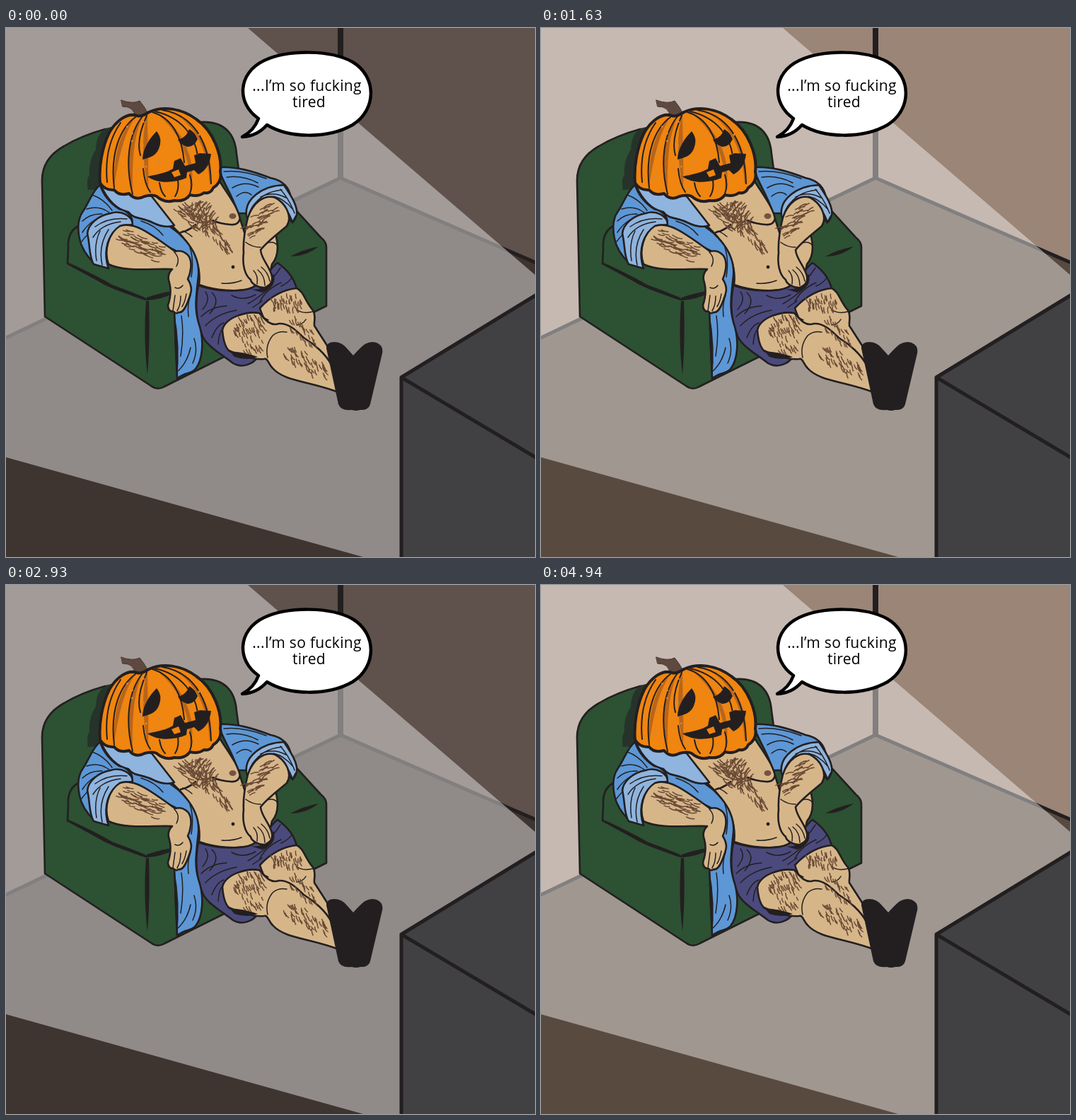
An HTML page for the animation above (5.01 s loop, 748 px wide and 748 px high).

```html
<!DOCTYPE html>
<html lang="en">
<head>
<meta charset="utf-8">
<title>Tired pumpkin</title>
<style>
html, body { margin: 0; width: 100%; height: 100%; overflow: hidden; }
svg { display: block; width: 100%; height: 100%; }
path { stroke-linejoin: round; stroke-linecap: round; }
.ink path, .line { stroke: #231f20; stroke-width: 2.6; }
.line { fill: none; }
.thin { stroke: #231f20; stroke-width: 1.5; fill: none; }
.dark { fill: #231f20; }
.green { fill: #2d5133; }
.skin { fill: #d6b689; }
.robe { fill: #5d97d6; }
.cuff { fill: #8fb4de; }
.shorts { fill: #4b4a7d; }
.hair { fill: none; stroke: #6a4a35; stroke-width: 1.5; }
.glow { animation: flicker 5.01s step-end infinite; }
/* The television light switches between two levels. */
@keyframes flicker {
  0%, 8.58%, 18.56%, 28.54%, 40.51%, 51.89%, 58.48%, 74.45%, 83.83%, 93.21% { opacity: 0; }
  3.99%, 12.57%, 25.14%, 32.53%, 44.51%, 55.88%, 63.87%, 79.84%, 89.22%, 98.6% { opacity: 1; }
}
text { font: 21px "Comic Sans MS", "Comic Neue", "Open Sans", sans-serif; letter-spacing: .3px; text-anchor: middle; }
</style>
</head>
<body>
<svg viewBox="0 0 748 748">
  <!-- room -->
  <path fill="#5f514b" d="M0,0H748V748H0Z"/>
  <path fill="#3e3430" d="M0,438L473,212L748,331V748H0Z"/>
  <g class="glow">
    <path fill="#9b8577" d="M0,0H748V748H0Z"/>
    <path fill="#594a40" d="M0,438L473,212L748,331V748H0Z"/>
  </g>
  <path class="line" style="stroke-width:5" d="M-4,440L473,212L752,333"/>
  <path class="line" style="stroke-width:8" d="M473,-5V211"/>
  <path fill="#fff" fill-opacity=".427" d="M0,0H342L748,349V748H505L0,607Z"/>

  <!-- television -->
  <path fill="#414143" d="M559,494L748,378V748H559Z"/>
  <path class="line" style="stroke-width:5" d="M559,752V494L752,376M559,494L752,609"/>

  <!-- armchair -->
  <g class="ink">
    <path class="green" d="M55,408L51,218C50,192 66,176 82,167C102,155 122,148 140,143L275,133C309,131 324,150 326,178L329,200L403,250L445,296Q453,302 453,310V393L224,507Q214,513 205,506Z"/>
  </g>
  <path fill="#26332a" d="M154,139C135,141 128,152 127,172C119,184 117,198 118,208C112,216 117,222 115,229L140,228L152,160Z"/>
  <path class="line" d="M104,279C91,285 87,298 88,312L87,333L139,361Q178,378 198,384Q218,383 236,374"/>
  <path class="dark" d="M87,331Q130,351 150,363Q180,374 201,383Q170,378 139,363ZM198,386L202,386Q204,445 200,490Q194,440 198,386ZM199,381Q220,374 236,372Q220,381 199,384ZM402,323Q420,313 442,309Q424,323 402,323Z"/>

  <!-- far sleeve -->
  <g class="ink">
    <path class="robe" d="M300,197C325,195 350,203 374,212C394,216 401,228 403,240C413,255 413,267 405,275L380,250L345,262L328,262C320,235 308,222 300,197Z"/>
    <path class="cuff" d="M340,265C337,242 362,223 393,222C403,237 413,252 411,264L405,275C399,257 389,246 375,239C357,239 345,252 342,272Z"/>
  </g>
  <path class="thin" d="M312,211Q335,208 356,219M308,203Q335,200 368,213M320,226Q338,215 357,225M326,238Q338,228 347,236M349,253Q361,232 390,229M360,239Q377,230 396,240M378,238Q393,241 406,257M388,228Q401,243 408,262"/>

  <!-- torso -->
  <g class="ink">
    <path class="skin" d="M200,235L300,213C310,231 328,252 331,270L340,298L381,291C387,313 383,326 376,334C374,349 365,360 352,368C325,374 295,371 273,363C277,330 260,303 235,280Z"/>
  </g>
  <path class="line" d="M331,269Q329,279 318,278Q303,277 292,272M247,289Q260,286 268,278"/>
  <path class="thin" d="M263,295Q256,289 250,287M366,305Q379,300 384,308M305,361Q321,362 333,357"/>
  <ellipse cx="320.500" cy="266" rx="5" ry="4" fill="#765240"/>
  <circle class="dark" cx="321" cy="338" r="2.400"/>

  <!-- shorts and legs -->
  <g class="ink">
    <path class="shorts" d="M272,364C300,374 335,373 348,367C367,358 374,338 384,332C398,342 408,355 411,369L366,399L359,406L310,419L316,457L357,464C350,475 334,482 321,474C303,460 281,448 277,433C268,411 268,385 272,364Z"/>
    <path class="skin" d="M359,396C372,382 390,370 411,368C421,372 424,389 434,399C439,408 435,415 436,421L454,449L466,505L420,470L383,430Q366,420 359,396Z"/>
    <path class="skin" d="M306,427C310,409 340,400 358,403C367,413 374,422 386,418C399,417 410,427 421,438C436,447 452,461 460,476L470,515C428,499 394,500 377,481C371,475 370,466 365,468C348,470 323,460 315,456C309,450 307,440 306,427Z"/>
  </g>
  <path class="thin" d="M370,466Q366,449 377,435Q385,428 397,430M358,403Q362,409 371,413M411,398Q420,405 434,401M411,420Q420,419 424,412"/>
  <path class="thin" d="M282,373Q290,384 278,398M291,374Q304,386 288,404M276,408Q290,394 312,393M282,421Q298,404 326,399M291,438Q298,420 308,417M300,447Q301,430 307,425M319,378Q335,387 353,377M342,390Q358,381 374,366M359,387Q367,370 389,360M373,358Q382,349 388,339M389,365Q400,360 404,353M349,395L362,386"/>
  <path class="dark" d="M316,457Q337,458 356,465Q341,471 323,465ZM345,369Q370,373 378,347Q385,365 362,374Z"/>
  <path class="dark" d="M453,453Q453,444 464,444Q475,444 482,453L491,463Q500,453 506,448Q515,442 524,445Q534,449 532,460L515,532Q512,541 501,540Q495,542 489,540Q474,542 470,532Z"/>

  <!-- robe front -->
  <g class="ink">
    <path class="robe" d="M168,250C195,255 225,275 244,290C262,307 274,328 272,350C269,379 266,395 272,416C281,441 278,470 268,482C261,490 253,486 242,496L238,400L255,350L240,315L180,285Z"/>
    <path class="cuff" d="M134,222L206,238L238,279Q225,284 207,275C191,267 181,271 173,260C158,258 143,243 134,222Z"/>
  </g>
  <path class="dark" d="M238,402Q247,450 242,496Q237,450 238,402Z"/>
  <path class="thin" d="M247,464Q252,433 248,407M260,310Q266,329 262,352M258,408Q256,391 261,378M242,486Q256,474 261,452M266,439Q272,456 264,474M191,273Q211,279 222,293"/>

  <!-- far forearm -->
  <g class="ink">
    <path class="skin" d="M342,268C349,247 365,235 381,240C397,249 405,268 397,280C382,293 367,304 360,314C361,327 373,337 376,351C378,362 370,365 366,367C358,368 347,362 346,356C337,349 334,333 336,318C335,302 338,284 342,268Z"/>
  </g>
  <path class="thin" d="M350,343Q357,350 355,362M356,342Q366,350 366,364M361,338Q371,346 373,358M339,303Q348,310 360,310"/>

  <!-- near sleeve and forearm -->
  <g class="ink">
    <path class="robe" d="M133,222C122,230 117,248 109,259C101,270 101,284 104,298C107,313 116,324 124,332L151,301L178,278C181,267 171,258 160,256C148,248 138,237 133,222Z"/>
    <path class="cuff" d="M179,278C179,266 163,257 148,262C131,265 116,277 115,291C119,305 117,324 124,334L145,340C138,320 142,300 153,288Q162,279 179,278Z"/>
    <path class="skin" d="M161,280C179,273 201,288 239,316Q250,313 258,322C265,332 260,349 257,355C265,368 262,374 257,387C253,398 248,403 244,402Q240,405 237,401Q229,401 229,392C233,380 234,371 231,360C228,352 230,346 235,341C205,340 167,345 145,334C138,315 145,290 161,280Z"/>
  </g>
  <path class="thin" d="M122,236Q139,242 150,258M114,256Q132,250 146,261M108,273Q119,262 136,263M108,289Q114,279 126,271M107,302Q112,295 116,292M128,329Q124,305 133,287M136,335Q130,308 145,285M126,281Q145,267 171,270M123,296Q135,277 162,274M239,378L236,400M247,379Q247,392 242,400M255,376Q253,388 249,394M241,337Q247,326 238,317M250,364Q245,370 239,367"/>

  <path id="hair" class="hair"/>

  <!-- pumpkin -->
  <path fill="#5e4940" class="line" style="fill:#5e4940;stroke:#463630;stroke-width:1" d="M163,102Q179,108 189,103Q195,110 201,121L182,126Q182,111 165,111Z"/>
  <path fill="#f0850f" stroke="#231f20" stroke-width="4" d="M185,124C171,119 155,132 146,148C136,168 131,197 133,219Q140,230 153,229Q160,238 174,234Q183,245 196,238Q207,235 213,238Q224,248 238,244Q253,246 260,236Q272,239 280,233Q289,235 293,226Q306,218 303,203C306,180 293,145 269,129C248,113 221,110 202,119Q192,126 185,124Z"/>
  <g fill="#b8651b">
    <path d="M183,126C164,141 151,176 153,225C159,182 168,147 183,126ZM193,125C174,147 169,191 179,233C178,187 181,151 193,125ZM200,123C193,144 191,175 201,231C202,180 200,150 200,123ZM210,119C242,141 263,183 260,232C273,188 247,136 210,119ZM222,116C260,124 286,165 288,222C298,180 272,126 222,116Z"/>
  </g>
  <path class="thin" style="stroke-width:2" d="M183,126C161,142 147,177 153,226M193,125C173,150 168,191 179,235M199,124C188,148 186,166 190,180M207,119C234,127 249,153 252,190M211,118C250,127 267,154 271,180M221,116C261,122 288,155 290,220M162,134C146,157 140,187 143,218M194,199Q196,221 204,232M217,219Q219,232 225,238M243,215Q245,229 239,238M260,208Q265,222 260,234"/>
  <path id="specks" fill="none" stroke="#c98b4a" stroke-width="2.800"/>
  <path class="dark" d="M193,186C193,171 203,156 213,146Q222,157 216,171C211,182 203,183 193,186ZM243,158Q256,154 259,143Q267,147 271,157Q266,168 257,168Q248,166 243,158ZM200,210C215,207 228,204 236,199L238,188L247,184L253,195L268,191L266,180L274,177L290,178C288,194 281,203 272,207L266,201L256,204L255,212C238,219 215,221 200,210Z"/>
  <path fill="#f0850f" d="M234,204L244,200L247,208L238,211Z"/>

  <!-- speech -->
  <path fill="#fff" stroke="#000" stroke-width="4.500" d="M357,128C326,107 327,64 365,46C400,30 460,31 490,48C525,69 524,116 490,137C455,157 400,156 369,137Q355,153 334,154Q351,145 357,128Z"/>
  <text x="425.500" y="89">...I’m so fucking</text>
  <text x="428.500" y="112">tired</text>
</svg>
<script>
let seed = 7;
const rnd = () => (seed = seed * 16807 % 2147483647) / 2147483647;
const jitter = r => (rnd() - .5) * r;

// Short strokes along a band from (x1,y1) to (x2,y2), pointing at a given angle.
function tuft(x1, y1, x2, y2, width, count, angle, length) {
  const dx = x2 - x1, dy = y2 - y1, span = Math.hypot(dx, dy);
  let d = '';
  for (let i = 0; i < count; i++) {
    const t = (i + rnd()) / count, off = jitter(width);
    const x = x1 + dx * t - dy / span * off, y = y1 + dy * t + dx / span * off;
    const a = (angle + jitter(30)) * Math.PI / 180, l = length * (.7 + rnd() * .6);
    const ex = l * Math.cos(a), ey = l * Math.sin(a);
    d += `M${x.toFixed(1)},${y.toFixed(1)}q${(ex * .5 - ey * .15).toFixed(1)},${(ey * .5 + ex * .15).toFixed(1)} ${ex.toFixed(1)},${ey.toFixed(1)}`;
  }
  return d;
}

document.getElementById('hair').setAttribute('d', [
  [243, 250, 272, 277, 20, 36, 35, 10],
  [272, 244, 294, 276, 24, 38, 130, 10],
  [262, 247, 291, 284, 20, 24, 75, 10],
  [283, 277, 316, 312, 14, 25, 60, 9],
  [158, 292, 215, 319, 25, 48, 15, 11],
  [347, 290, 383, 250, 19, 38, 155, 10],
  [321, 423, 364, 419, 32, 48, 65, 7],
  [335, 450, 363, 448, 14, 15, 60, 6],
  [376, 391, 416, 382, 23, 34, 80, 7],
  [400, 412, 440, 446, 18, 27, 65, 7],
  [395, 455, 452, 487, 24, 48, 65, 7]
].map(band => tuft(...band)).join(''));

let dots = '';
for (let i = 0; i < 34; i++) {
  const a = rnd() * 6.283, r = Math.sqrt(rnd());
  dots += `M${(219 + 74 * r * Math.cos(a)).toFixed(1)},${(179 + 52 * r * Math.sin(a)).toFixed(1)}h.1`;
}
document.getElementById('specks').setAttribute('d', dots);
</script>
</body>
</html>
```
